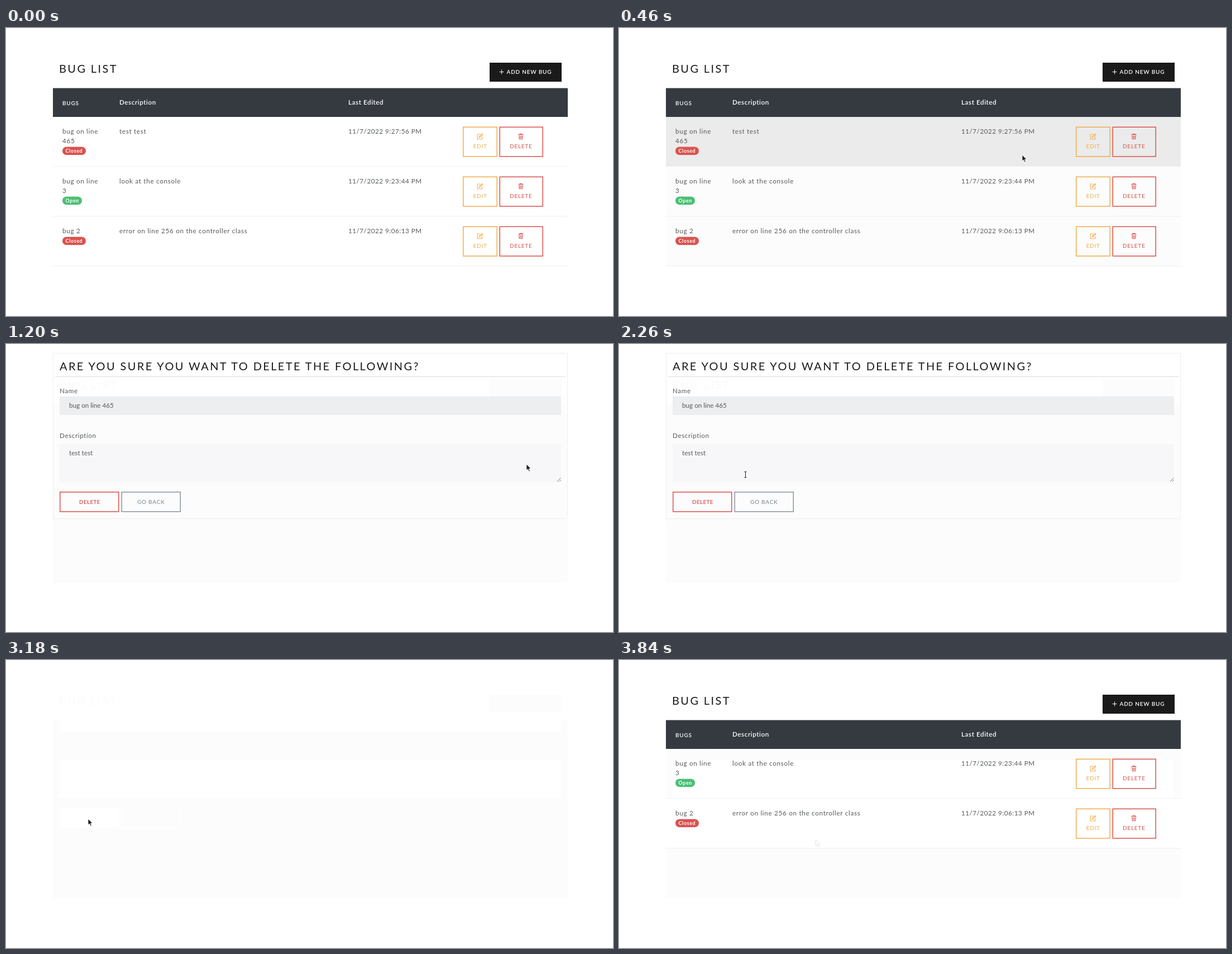
An HTML page for the animation above (4370 ms loop, 1087 by 515 pixels).

```html
<!DOCTYPE html>
<html lang="en">
<head>
<meta charset="utf-8">
<title>Bug list</title>
<style>
  html, body { margin: 0; width: 100%; height: 100%; overflow: hidden; background: #fff; }
  svg { display: block; width: 100%; height: 100%; font-family: Lato, "Open Sans", sans-serif; }
  text { fill: #55595c; font-size: 11.7px; letter-spacing: .69px; white-space: pre; }
  .title { fill: #1a1a1a; font-size: 20px; letter-spacing: 2.37px; }
  .head { fill: #fff; font-weight: 600; letter-spacing: .55px; }
  .caps { fill: #fff; font-size: 10px; font-weight: 600; letter-spacing: .8px; }
  .time { letter-spacing: .5px; }
  .label { letter-spacing: .58px; }
  .field { letter-spacing: 0; }
  .badge { fill: #fff; font-size: 8.8px; font-weight: 700; letter-spacing: .7px; }
  .btn { font-size: 10px; letter-spacing: .75px; }
  .tight { letter-spacing: .3px; font-weight: 600; }
  .ghost { fill: #fafafa; }
  .icon { fill: none; stroke-width: 1.1; }
</style>
</head>
<body>
<svg id="stage" viewBox="0 0 1087 515" xmlns="http://www.w3.org/2000/svg"></svg>
<script>
const LOOP = 4370;
const RED = '#d9534f', GREEN = '#4bbf73', AMBER = '#f0ad4e', GREY = '#8a959c';
const TOP = 159, PITCH = 89, LEFT = 84, WIDTH = 922;
const FAINT = '#fcfcfc', HOVER = '#ebebeb';

const LIST_END = 1130, FORM_START = 1200, FORM_END = 3180, LIST_BACK = 3250;
const ROW_HOT = 590, FORM_HOT = 2390, FADE = 140;

const text = (x, y, s, cls = '', style = '') =>
  `<text x="${x}" y="${y}" class="${cls}" style="${style}">${s}</text>`;
const box = (x, y, w, h, attrs) =>
  `<rect x="${x}" y="${y}" width="${w}" height="${h}" ${attrs}/>`;
const outline = (x, y, w, h, color) =>
  box(x + .75, y + .75, w - 1.5, h - 1.5, `fill="none" stroke="${color}" stroke-width="1.5"`);
const group = (id, body, attrs = '') => `<g id="${id}" ${attrs}>${body}</g>`;

const pencil = color => `<path class="icon" stroke="${color}"
  d="M849 190H844.2V198.800H852.800V194.5M847.2 196L847.8 193.800L852.300 189.300L853.700 190.700L849.200 195.300Z"/>`;
const trash = color => `<path class="icon" stroke="${color}"
  d="M917.500 190.500H926.500M920 190V189.500H924V190M918.700 191.500L919.300 198.500H924.700L925.300 191.500M921 192.500V197M923 192.500V197"/>`;

function deleteButton(color) {
  return trash(color) + text(902, 215, 'DELETE', 'btn', `fill:${color}`);
}

function row(id, index, { name, status, about, time }) {
  const lines = name.map((s, i) => text(101, 189 + 17 * i, s)).join('');
  const y = 195.500 + 17 * (name.length - 1);
  const open = status === 'Open';
  const badge = box(101, y, open ? 35 : 42, 14.500, `rx="7.2" fill="${open ? GREEN : RED}"`)
    + text(106.500, y + 10.500, status, 'badge');
  return group(id,
    box(LEFT, TOP, WIDTH, PITCH, 'class="fill" fill="none"')
    + box(LEFT, TOP + PITCH - 1, WIDTH, 1, 'fill="#f0f0f1"')
    + lines + badge
    + text(203, 189, about) + text(613, 189, time, 'time')
    + outline(818, 176.500, 62, 54, AMBER) + pencil(AMBER)
    + text(836.500, 215, 'EDIT', 'btn', `fill:${AMBER}`)
    + outline(883.500, 176.500, 78.500, 54, RED) + deleteButton(RED)
    + `<g class="hot" opacity="0">${box(883.500, 176.500, 78.500, 54, `fill="${RED}"`)}${deleteButton('#fff')}</g>`,
    `transform="translate(0 ${index * PITCH})"`);
}

const bugs = [
  { name: ['bug on line', '465'], status: 'Closed', about: 'test test', time: '11/7/2022 9:27:56 PM' },
  { name: ['bug on line', '3'], status: 'Open', about: 'look at the console', time: '11/7/2022 9:23:44 PM' },
  { name: ['bug 2'], status: 'Closed', about: 'error on line 256 on the controller class', time: '11/7/2022 9:06:13 PM' },
];

const header = text(95, 80, 'BUG LIST', 'title')
  + box(866, 62, 129, 34, 'fill="#1a1a1a"')
  + '<path d="M883.500 78.500H891.500M887.500 74.500V82.500" stroke="#fff"/>'
  + text(896.500, 82, 'ADD NEW BUG', 'caps')
  + box(LEFT, 107.500, WIDTH, 51.500, 'fill="#343a40"')
  + text(101, 137.500, 'BUGS', 'caps')
  + text(203, 137, 'Description', 'head') + text(613, 137, 'Last Edited', 'head');

// Faint shade left behind by pages already seen.
const residue = box(LEFT, 107, WIDTH, 319, `fill="${FAINT}"`)
  + box(866, 62, 129, 34, `fill="${FAINT}"`) + text(95, 80, 'BUG LIST', 'title ghost');
const blanks = box(96, 94, 898, 34, 'fill="#fff"') + box(96, 179, 898, 68, 'fill="#fff"')
  + box(96, 264, 107, 37, 'fill="#fff"') + outline(206.500, 264, 107, 37, '#fff')
  + text(235, 285.500, 'GO BACK', 'btn', 'fill:#fff') + text(96, 168, 'Description', 'label', 'fill:#fff');

const form = box(84.500, 16.500, 921, 296, 'fill="none" stroke="#eee"')
  + box(85, 17, 920, 41, 'fill="#fff"')
  + text(96, 46.500, 'ARE YOU SURE YOU WANT TO DELETE THE FOLLOWING?', 'title')
  + box(88, 58, 914, 1, 'fill="#dcdcdc"')
  + text(96, 88, 'Name', 'label')
  + box(96, 93.500, 898, 33.500, 'fill="#eceeef"') + text(113, 114, 'bug on line 465', 'field')
  + text(96, 168, 'Description', 'label')
  + box(96, 179, 898, 68, 'fill="#f7f7f9"') + text(113, 199, 'test test', 'field')
  + '<path d="M987 246L993.5 239.5M991 246L993.5 243.5" stroke="#777"/>'
  + outline(96, 264, 106.500, 36.500, RED) + text(131, 285.500, 'DELETE', 'btn tight', `fill:${RED}`)
  + group('formHot', box(96, 264, 106.500, 36.500, `fill="${RED}"`)
    + text(131, 285.500, 'DELETE', 'btn tight', 'fill:#fff'))
  + outline(206.500, 264, 106.500, 36.500, GREY)
  + text(235, 285.500, 'GO BACK', 'btn', `fill:${GREY};font-weight:600`);

const ARROW = 'M0 0V11L2.600 8.700L4.600 13L6.400 12.200L4.500 8H8Z';
const pointers = group('arrow', `<path d="${ARROW}" fill="#1c1c1c" stroke="#fff" stroke-width=".8"/>`)
  + group('hand', `<path d="M-1.500 1.300a1.300 1.300 0 0 1 2.600 0V6l4 .8q1.800.4 1.700 2l-.7 4-.8 3h-6l-4.200-6q.8-1.700 3.400.2z"
      fill="#fff" stroke="#333" stroke-width="1"/>
      <path d="M1.200 6V8M3.200 6.500V8.300M5 7V8.600" stroke="#333" stroke-width=".8"/>`)
  + group('beam', '<path d="M-1.500 -4.500H2.500M.5 -4.500V5.500M-1.500 5.500H2.500" stroke="#222" fill="none"/>');

document.getElementById('stage').innerHTML =
  group('residue', residue) + group('blanks', blanks)
  + group('header', header)
  + group('before', bugs.map((bug, i) => row('a' + i, i, bug)).join(''))
  + group('after', bugs.slice(1).map((bug, i) => row('b' + i, i, bug)).join(''))
  + group('form', form)
  + group('trail', `<path d="${ARROW}" fill="#fdfdfd" stroke="#e6e6e6" transform="translate(352 321)"/>`)
  + group('cursor', pointers);

// Pointer stops: start time, x, y, shape (kept from the previous stop when omitted).
const stops = [
  [260, 834, 388, 'hand'], [330, 792, 322, 'arrow'], [390, 748, 268], [460, 722, 227],
  [520, 768, 212], [590, 896, 210, 'hand'], [660, 926, 214], [730, 932, 215],
  [1130, 932, 215, 'arrow'], [1260, 932, 215, 'beam'],
  [1330, 876, 266, 'arrow'], [1400, 765, 299], [1460, 638, 306], [1530, 500, 262],
  [1590, 370, 195, 'beam'], [1660, 240, 128, 'arrow'], [1720, 221, 100, 'beam'], [1790, 218, 91],
  [1860, 216, 98], [1920, 218, 138, 'arrow'], [1990, 224, 190, 'beam'], [2060, 225, 229],
  [2260, 226, 233], [2330, 214, 252, 'arrow'], [2390, 180, 270, 'hand'], [2450, 152, 277], [2520, 142, 274],
  [2980, 143, 275], [3120, 147, 284], [3180, 147, 284, 'arrow'],
  [3380, 160, 287], [3450, 205, 296], [3510, 272, 307], [3580, 352, 321],
  [3640, 446, 349], [3710, 608, 416], [3770, 804, 502], [3840, 1100, 600],
];
stops.forEach((s, i) => { s[3] = s[3] || stops[i - 1][3]; });

const $ = id => document.getElementById(id);
const show = (id, on) => { $(id).style.display = on ? '' : 'none'; };
const fade = (t, start) => Math.max(0, Math.min(1, (t - start) / FADE));

function paintRows(prefix, count, hovered, idle) {
  for (let i = 0; i < count; i++) {
    $(prefix + i).querySelector('.fill').setAttribute('fill', i === hovered ? HOVER : idle(i));
  }
}

function draw(now) {
  const t = now % LOOP;
  const stop = stops.filter(s => s[0] <= t).pop();
  const [, x, y, shape] = stop || [0, -99, -99, 'arrow'];
  const hovered = Math.floor((y - TOP) / PITCH);
  const before = t < LIST_END, after = t >= LIST_BACK;

  show('header', before || after);
  show('before', before);
  show('after', after);
  show('form', t >= FORM_START && t < FORM_END);
  show('residue', !before);
  show('blanks', t >= FORM_END);
  show('trail', t >= 3640);

  paintRows('a', 3, hovered, () => t < 330 ? 'none' : FAINT);
  paintRows('b', 2, hovered, i => i ? '#fff' : 'none');
  $('a0').querySelector('.hot').setAttribute('opacity', fade(t, ROW_HOT));
  $('formHot').setAttribute('opacity', fade(t, FORM_HOT));

  $('cursor').setAttribute('transform', `translate(${x} ${y})`);
  for (const name of ['arrow', 'hand', 'beam']) show(name, name === shape);
}

const origin = performance.now();
function tick() {
  draw(performance.now() - origin);
  requestAnimationFrame(tick);
}
tick();
</script>
</body>
</html>
```
